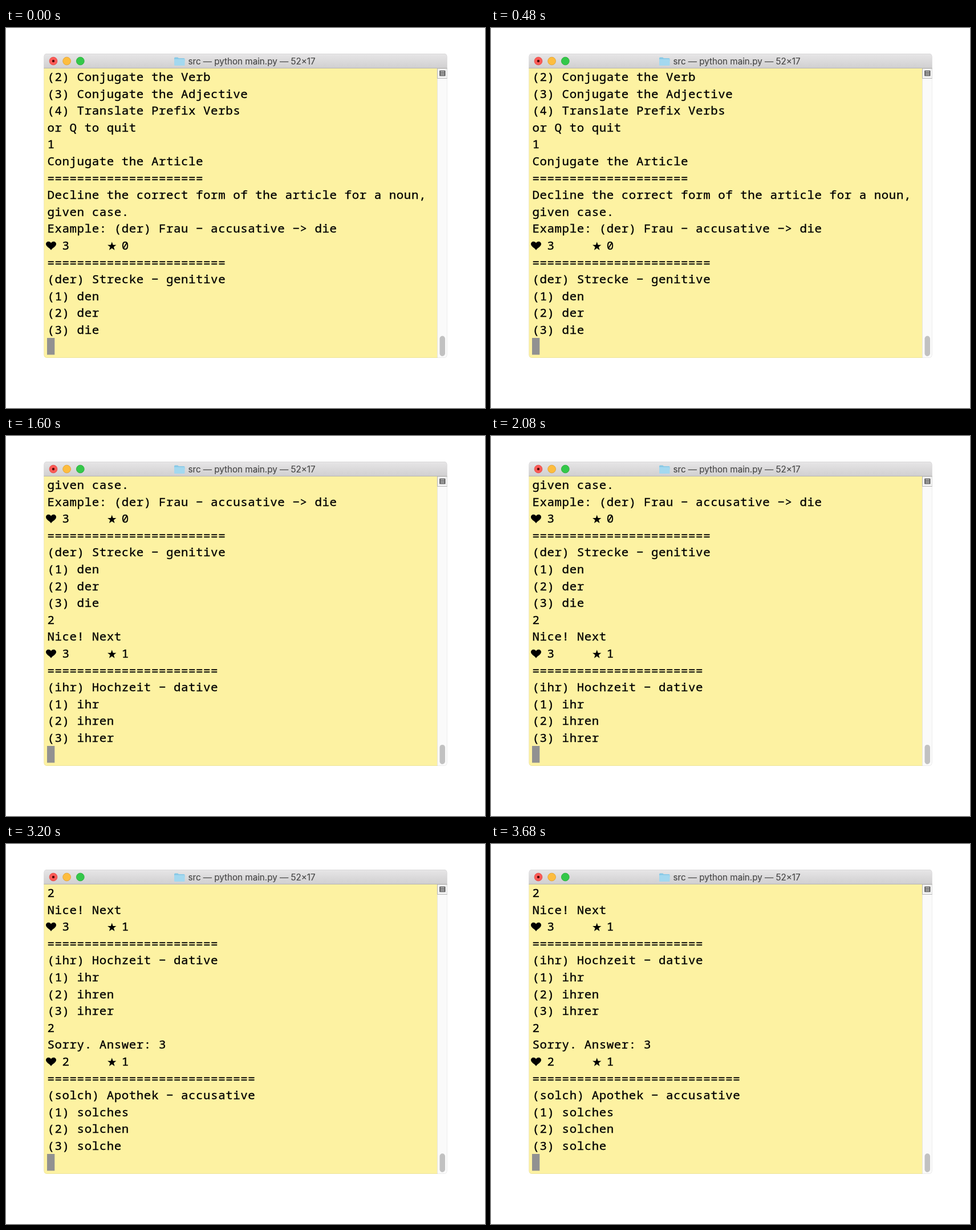
These frames come from a looping animation (840x667 px, 4000 ms). An HTML page:

```html
<!DOCTYPE html>
<html lang="en">
<head>
<meta charset="utf-8">
<title>Terminal quiz</title>
<style>
html, body { margin: 0; width: 100%; height: 100%; overflow: hidden; background: #fff; }
svg { display: block; }
#screen { font: 20.8px "Noto Sans Mono", monospace; letter-spacing: .55px; }
#screen text { white-space: pre; stroke: #000; stroke-width: .35; }
.title { font: 15.2px Inter, sans-serif; fill: #464646; stroke: #464646; stroke-width: .15; }
</style>
</head>
<body>
<svg width="840" height="667" viewBox="0 0 840 667">
  <defs>
    <linearGradient id="bar" x2="0" y2="1">
      <stop stop-color="#e7e6e7"/><stop offset="1" stop-color="#d0cfd0"/>
    </linearGradient>
    <clipPath id="frame"><rect x="66.5" y="45" width="707" height="534" rx="5"/></clipPath>
    <path id="heart" d="M7 1C5-3-2-5-2-10C-2-15 5-16 7-11.5C9-16 16-15 16-10C16-5 9-3 7 1Z"/>
    <path id="star" d="M9.5-13.7L11.4-8.2H17.2L12.6-4.7L14.3.9L9.5-2.4L4.7.9L6.4-4.7L1.8-8.2H7.6Z"/>
  </defs>
  <g clip-path="url(#frame)">
    <path fill="#fdf2a2" d="M66 70H757V579H66Z"/>
    <path fill="url(#bar)" d="M66 45H774V70.5H66Z"/>
    <path fill="#b6b5b0" d="M66 70H774V71H66Z"/>
    <path fill="#fafafa" d="M757 71H774V579H757Z"/>
    <path fill="#e6e4da" d="M756 71H757V579H756Z"/>
    <path fill="#f4f4f4" stroke="#b4b4b4" d="M756.5 71H774V88.5H756.5Z"/>
    <path fill="none" stroke="#444" stroke-width="1.4" d="M761 75.5H769.7V83.5H761ZM761 78.2H769.7M761 80.8H769.7"/>
    <rect x="66.5" y="45" width="707" height="534" rx="5" fill="none" stroke="#000" stroke-opacity=".12"/>
  </g>
  <g stroke-width=".8">
    <circle cx="83" cy="58" r="6.9" fill="#fc5b57" stroke="#e2463f"/>
    <circle cx="83" cy="58" r="2.2" fill="#4d0000"/>
    <circle cx="106.6" cy="58" r="6.9" fill="#fdbd3f" stroke="#e0a032"/>
    <circle cx="130.3" cy="58" r="6.9" fill="#34c84a" stroke="#25ab35"/>
  </g>
  <path fill="#86c8e6" d="M295 53Q295 51.5 296.5 51.5H301L303 53H312Q313.5 53 313.5 54.5V58H295Z"/>
  <rect x="295" y="54.5" width="18.5" height="11.5" rx="1" fill="#a3d8ef"/>
  <text class="title" x="431" y="64" text-anchor="middle">src — python main.py — 52×17</text>
  <rect id="thumb" x="760.5" width="9.5" rx="4.7" fill="#c1c1c1"/>
  <rect id="cursor" y="544" width="13.3" height="29.5" fill="#919191"/>
  <g id="screen"></g>
</svg>
<script>
const CELL = 13.03, ROW = 29.6, LEFT = 72, BASE = 93, ROWS = 17, STEP = 800;

const question = (lives, score, noun, ...answers) => [
  `♥ ${lives}     ★ ${score}`,
  "=".repeat(noun.length),
  noun,
  ...answers.map((a, i) => `(${i + 1}) ${a}`)
];

const transcript = [
  "(2) Conjugate the Verb",
  "(3) Conjugate the Adjective",
  "(4) Translate Prefix Verbs",
  "or Q to quit",
  "1",
  "Conjugate the Article",
  "=".repeat(21),
  "Decline the correct form of the article for a noun,",
  "given case.",
  "Example: (der) Frau − accusative −> die",
  ...question(3, 0, "(der) Strecke − genitive", "den", "der", "die"),
  "2",
  "Nice! Next",
  ...question(3, 1, "(ihr) Hochzeit − dative", "ihr", "ihren", "ihrer"),
  "2",
  "Sorry. Answer: 3",
  ...question(2, 1, "(solch) Apothek − accusative", "solches", "solchen", "solche"),
  ""
];

const $ = id => document.getElementById(id);
const symbols = { "♥": "heart", "★": "star" };

function lineMarkup(line, row) {
  const y = BASE + row * ROW;
  const icons = [...line].map((c, col) => symbols[c]
    ? `<use href="#${symbols[c]}" x="${LEFT + col * CELL}" y="${y}"/>` : "").join("");
  const text = line.replace(/[♥★]/g, " ").replace(">", "&gt;");
  return `${icons}<text x="${LEFT + 0.5}" y="${y}">${text}</text>`;
}

function draw(step) {
  const round = step >> 1, typed = step % 2;
  const lines = transcript.slice(round * 8, round * 8 + ROWS);
  if (!typed) lines[ROWS - 1] = "";
  $("screen").innerHTML = lines.map(lineMarkup).join("");
  $("cursor").setAttribute("x", LEFT + typed * CELL);
  const top = 540.5 + round * 1.4;
  $("thumb").setAttribute("y", top);
  $("thumb").setAttribute("height", 576 - top);
}

let shown = -1;
function tick() {
  const step = Math.floor(performance.now() / STEP) % 5;
  if (step !== shown) draw(shown = step);
  requestAnimationFrame(tick);
}
tick();
</script>
</body>
</html>
```
